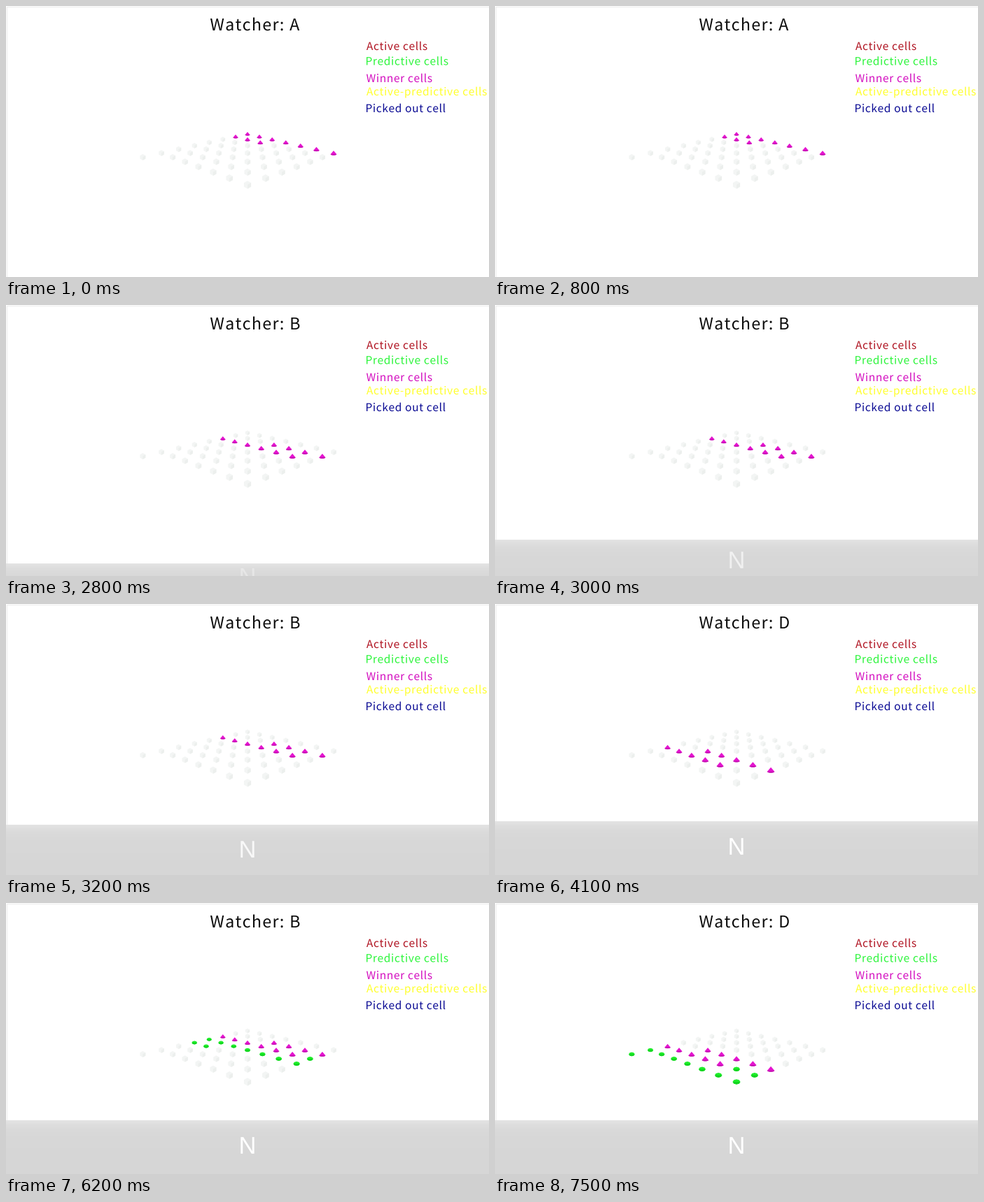
Write a matplotlib script that moves like this. It is 690x388 px and loops after 8000 ms.

```python
import numpy as np
import matplotlib.pyplot as plt
from matplotlib.animation import FuncAnimation
from matplotlib.collections import PolyCollection
from matplotlib.patches import PathPatch, Rectangle
from matplotlib.path import Path
from matplotlib.textpath import TextPath, text_to_path
from matplotlib.transforms import Affine2D

W, H = 690, 388
STEP, FRAMES = 100, 80
COLS, CELLS, GROUP = 7, 50, 10
WORDS = "ABCDE"

# Times in ms
FIRST_BEAT, BEAT = 2660, 684
BAR_START, BAR_END = 2720, 3385
BAR_HEIGHT = 77

fig = plt.figure(figsize=(W / 100, H / 100), dpi=100, facecolor="white")
ax = fig.add_axes([0, 0, 1, 1])
ax.set_axis_off()


def font(family):
    return fig.text(0, 0, "", family=family).get_fontproperties()


SANS = font("Noto Sans CJK JP")
BAR_FONT = font("Liberation Sans")


def spaced(text, size, gap):
    """Outline of a line of text with even letter spacing, baseline at y=0."""
    prop = SANS.copy()
    prop.set_size(size)

    def width(s):
        return text_to_path.get_text_width_height_descent(s, prop, False)[0]

    x, glyphs = 0.0, []
    for ch in text:
        if ch != " ":
            glyphs.append(TextPath((x, 0), ch, size=size, prop=SANS))
        x += width("H" + ch + "H") - width("HH") + gap
    path = Path.make_compound_path(*glyphs)
    return path.transformed(Affine2D().translate(-path.get_extents().x0, 0))


def place(path, x, y):
    return path.transformed(Affine2D().scale(1, -1).translate(x, y))


def add_path(path, color, z=3):
    return ax.add_patch(PathPatch(path, fc=color, lw=0, zorder=z))


# Legend and title
LEGEND = [
    ("Active cells", 63, "#b01422"),
    ("Predictive cells", 84.5, "#2df53c"),
    ("Winner cells", 109, "#d40fc0"),
    ("Active-predictive cells", 128, "#ffff2e"),
    ("Picked out cell", 152, "#0b0b94"),
]
for label, y, color in LEGEND:
    add_path(place(spaced(label, 15.5, 0.64), 515, y), color)

titles = [place(spaced("Watcher: " + w, 23.3, 1.3), 292, 35) for w in WORDS]
title = add_path(titles[0], "#0c0c0c")

ax.add_patch(Rectangle((0.5, 0.5), W - 1, H - 1, fill=False, ec="#ebebeb", lw=0.72))


def arc(n, rx, ry, start=0, sweep=360, cy=0.0):
    """n corners along an ellipse; angles run clockwise on screen."""
    a = np.radians(start + sweep * np.arange(n) / (n if sweep == 360 else n - 1))
    return np.column_stack([rx * np.cos(a), cy + ry * np.sin(a)])


# Facets of each cell shape, in units of the cell scale
APEX = [[0, -2.7]]
IDLE = [
    (arc(6, 3.5, 3.4, 30), "#f3f5f4"),
    (np.vstack([arc(3, 3.5, 3.4, -30, 120), [[0, 0]]]), "#ecefed"),
]
WINNER = [
    (np.vstack([APEX, arc(7, 3.5, 1.2, 0, 180, 1.4)]), "#e414cf"),
    (arc(7, 3.5, 1.2, 0, 180, 1.4), "#c00eae"),
]
PREDICTED = [
    (arc(8, 3.3, 2.2), "#1fee2b"),
    (arc(5, 3.3, 2.2, 0, 180), "#12d61f"),
]


def project(i):
    """Screen position and scale of cell i on the receding grid."""
    row, col = divmod(i, COLS)
    scale = 1 / (1 - 0.033 * (row + col))
    return (345 + 16.44 * (col - row) * scale,
            183 + 3.674 * (row + col) * scale, scale)


order = sorted(range(CELLS), key=lambda i: project(i)[1])
cells = ax.add_collection(PolyCollection([], linewidths=0, zorder=2))


def draw_cells(active, predicted):
    verts, colors = [], []
    for i in order:
        x, y, scale = project(i)
        group = i // GROUP
        shape = WINNER if group == active else PREDICTED if group == predicted else IDLE
        for points, color in shape:
            verts.append(points * scale + (x, y))
            colors.append(color)
    cells.set_verts(verts)
    cells.set_facecolor(colors)


# Sliding bar, lighter along its top edge, with its letter
shade = 214 + 13 * np.exp(-np.arange(BAR_HEIGHT) / 9)
bar = ax.imshow(shade[:, None] / 255, cmap="gray", vmin=0, vmax=1,
                aspect="auto", zorder=4)
letter_path = TextPath((0, 0), "N", size=34.5, prop=BAR_FONT)
box = letter_path.get_extents()
letter_path = letter_path.transformed(
    Affine2D().translate(-(box.x0 + box.x1) / 2, -(box.y0 + box.y1) / 2))
letter = add_path(letter_path, "white", 5)


def draw_bar(ms):
    u = min(max((ms - BAR_START) / (BAR_END - BAR_START), 0), 1)
    drop = BAR_HEIGHT * (1 - u) ** 2
    top = H - BAR_HEIGHT + drop
    bar.set_visible(u > 0)
    letter.set_visible(u > 0)
    bar.set_extent((0, W, top + BAR_HEIGHT, top))
    letter.set_path(place(letter_path, 345, 347 + 0.7 * drop))
    letter.set_alpha(u ** 0.5)
    ax.set_xlim(0, W)
    ax.set_ylim(H, 0)


def update(frame):
    ms = frame * STEP
    beat = max(0, (ms - FIRST_BEAT) // BEAT + 1)
    active = beat % len(WORDS)
    learned = beat >= len(WORDS)  # predictions appear from the second round
    draw_cells(active, active + 1 if learned else None)
    title.set_path(titles[active])
    draw_bar(ms)
    return cells, title, bar, letter


anim = FuncAnimation(fig, update, frames=FRAMES, interval=STEP, repeat=True,
                     repeat_delay=0, blit=False)
plt.show()
```
